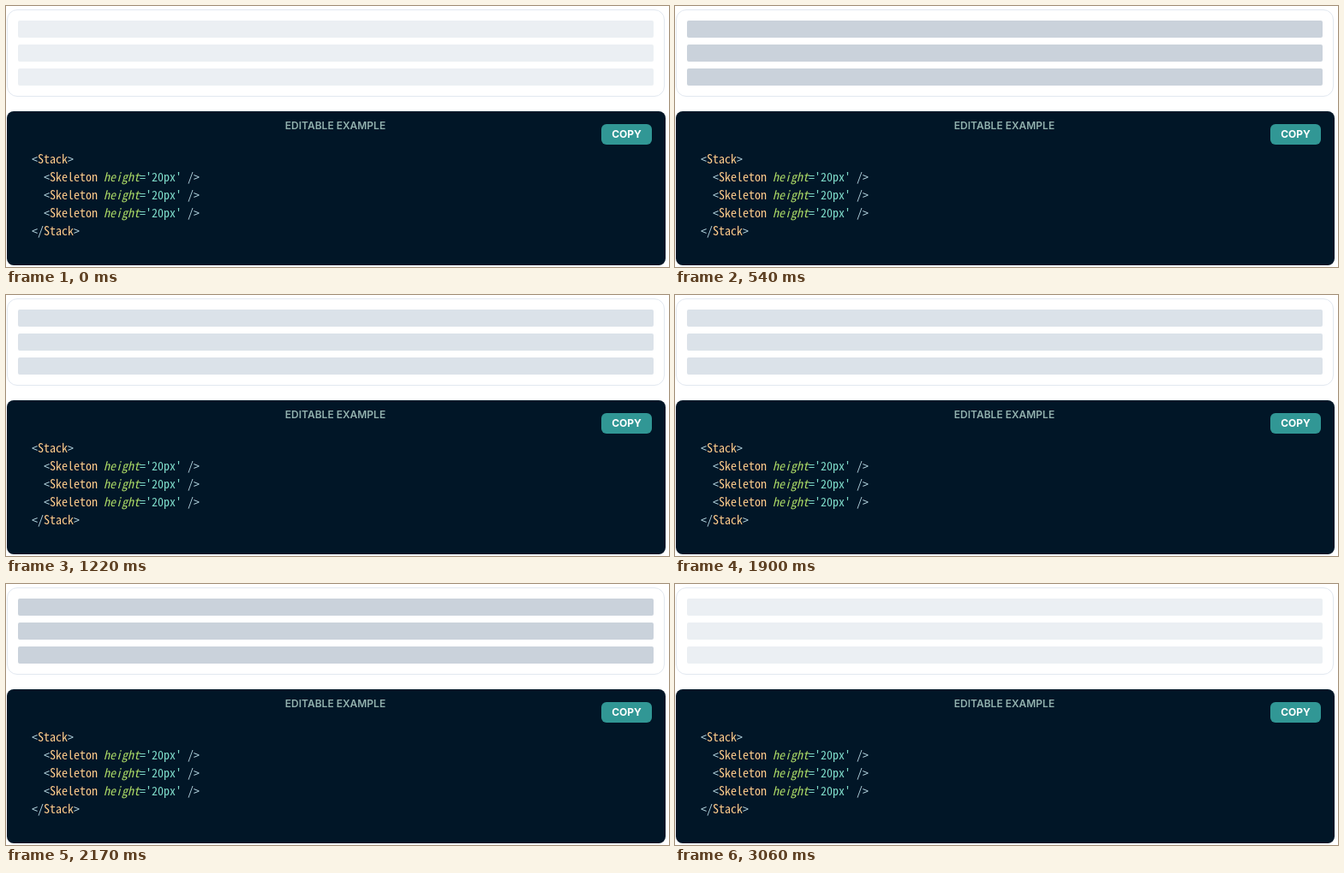
An HTML page for the animation above (3320 ms loop, 774x305 px).

```html
<!DOCTYPE html>
<html lang="en">
<head>
<meta charset="utf-8">
<style>
  html, body { margin: 0; width: 100%; height: 100%; overflow: hidden; background: #fff; }
  div, pre { position: absolute; box-sizing: border-box; margin: 0; }
  .card { left: 1px; top: 4px; width: 768px; height: 102px; border: 1px solid #e2e8f0; border-radius: 12px; }
  .bar { left: 12px; width: 742px; height: 20px; border-radius: 2px; background: var(--tone); }
  .editor { left: 1px; top: 123px; width: 769px; height: 180px; border-radius: 8px; background: #011627; }
  .title, .copy { font: 600 12px/18px Inter, sans-serif; text-align: center; }
  .title { left: 0; top: 8px; width: 767px; color: #93b1ae; }
  .copy { left: 694px; top: 15px; width: 59px; height: 24px; border-radius: 6px;
          font-weight: 700; line-height: 24px; color: #fff; background: #319795; }
  pre { left: 29px; top: 45px; font: 14px/21px "Noto Sans Mono CJK JP", "Noto Sans Mono", monospace; color: #b5d5e0; }
  b { font-weight: 400; color: #ffcb8b; }
  i { color: #addb67; }
  s { text-decoration: none; color: #7fdbca; }
</style>
</head>
<body>
<div class="card"></div>
<div class="editor">
  <div class="title">EDITABLE EXAMPLE</div>
  <div class="copy">COPY</div>
  <pre></pre>
</div>
<script>
  const card = document.querySelector('.card');
  for (let row = 0; row < 3; row++) {
    const bar = document.createElement('div');
    bar.className = 'bar';
    bar.style.top = 12 + row * 28 + 'px';
    card.append(bar);
  }

  const line = "  &lt;<b>Skeleton</b> <i>height</i><s>='20px'</s> /&gt;\n";
  document.querySelector('pre').innerHTML =
    '&lt;<b>Stack</b>&gt;\n' + line.repeat(3) + '&lt;/<b>Stack</b>&gt;';

  // The pulse holds each tone from its start time until the next one.
  const LOOP = 3320;
  const tones = [
    [0, '#ebeff3'], [260, '#dbe2e9'], [540, '#cad2db'], [1220, '#dbe2e9'],
    [1490, '#edf0f4'], [1900, '#dbe2e9'], [2170, '#cad2db'], [2850, '#dbe2e9'],
    [3060, '#ebeff3']
  ];
  const start = performance.now();
  function draw() {
    const t = (performance.now() - start) % LOOP;
    card.style.setProperty('--tone', tones.findLast(([from]) => from <= t)[1]);
    requestAnimationFrame(draw);
  }
  draw();
</script>
</body>
</html>
```
